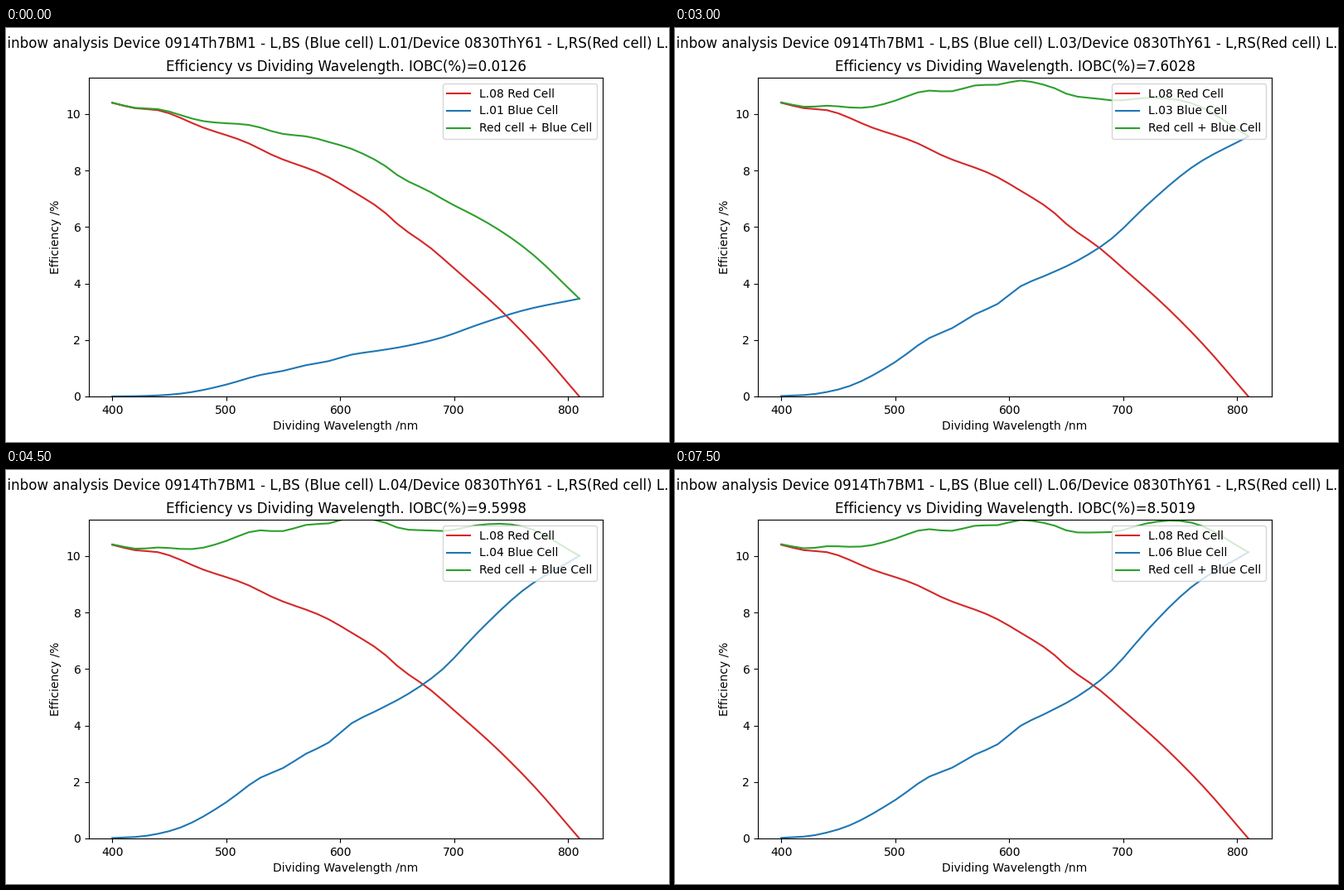
Recreate the animation shown at these times as a matplotlib script. Size 800 by 500 pixels, loop 8000 ms.

```python
import numpy as np
import matplotlib.pyplot as plt
from matplotlib.animation import FuncAnimation

plt.rcParams["font.family"] = "DejaVu Sans"
plt.rcParams["text.hinting_factor"] = 64   # finer letter spacing

INTERVAL = 500   # ms per step
HOLD = 3         # steps each cell stays on screen
STEPS = 16

WAVE = np.arange(400, 811, 10)


def smooth(x, points):
    """Cubic Hermite curve through (x, y) key points, flat outside them."""
    xk, yk = np.array(points, dtype=float).T
    x = np.clip(x, xk[0], xk[-1])
    slope = np.gradient(yk, xk)
    i = np.clip(np.searchsorted(xk, x, side="right") - 1, 0, len(xk) - 2)
    h = xk[i + 1] - xk[i]
    t = (x - xk[i]) / h
    return ((1 + 2 * t) * (1 - t) ** 2 * yk[i]
            + t * (1 - t) ** 2 * h * slope[i]
            + t ** 2 * (3 - 2 * t) * yk[i + 1]
            + t ** 2 * (t - 1) * h * slope[i + 1])


red = smooth(WAVE, [
    (400, 10.40), (420, 10.21), (440, 10.14), (480, 9.52), (520, 8.96),
    (540, 8.56), (590, 7.76), (610, 7.29), (640, 6.49), (650, 6.12),
    (680, 5.24), (700, 4.54), (740, 3.09), (770, 1.86), (810, 0)])

# All blue cells share one response, each scaled by its own slowly varying gain
response = smooth(WAVE, [
    (400, 0.015), (430, 0.09), (460, 0.37), (500, 1.22), (530, 2.07),
    (550, 2.42), (570, 2.91), (590, 3.28), (610, 3.90), (630, 4.25),
    (660, 4.81), (690, 5.59), (720, 6.74), (760, 8.10), (810, 9.21)])

GAIN_AT = (440, 500, 560, 650, 740, 810)
CELLS = [  # IOBC, gain at each wavelength above
    (0.0126, (0.23, 0.344, 0.378, 0.375, 0.375, 0.376)),
    (0.5622, (0.73, 0.787, 0.80, 0.791, 0.777, 0.776)),
    (7.6028, (1, 1, 1, 1, 1, 1)),
    (9.5998, (1.05, 1.05, 1.03, 1.063, 1.08, 1.087)),
    (9.2281, (1.20, 1.082, 1.023, 1.054, 1.121, 1.139)),
    (8.5019, (1.33, 1.115, 1.027, 1.041, 1.095, 1.101)),
]

fig, ax = plt.subplots(figsize=(8, 5), dpi=100)
ax.plot(WAVE, red, color="tab:red", label="L.08 Red Cell")
blue_line, = ax.plot(WAVE, response, color="tab:blue", label="L.01 Blue Cell")
sum_line, = ax.plot(WAVE, red + response, color="tab:green",
                    label="Red cell + Blue Cell")
ax.set_xlim(379.5, 830.5)
ax.set_ylim(0, 11.29)
ax.set_xlabel("Dividing Wavelength /nm")
ax.set_ylabel("Efficiency /%")
blue_label = ax.legend(loc="upper right").get_texts()[1]
title = ax.set_title("")
heading = fig.suptitle("")


def update(step):
    k = step // HOLD
    cell = f"L.{k + 1:02d}"
    iobc, gain = CELLS[k]
    blue = response * smooth(WAVE, list(zip(GAIN_AT, gain)))
    blue_line.set_ydata(blue)
    sum_line.set_ydata(red + blue)
    blue_label.set_text(f"{cell} Blue Cell")
    title.set_text(f"Efficiency vs Dividing Wavelength. IOBC(%)={iobc:.4f}")
    heading.set_text(f"Rainbow analysis Device 0914Th7BM1 - L,BS (Blue cell) {cell}"
                     "/Device 0830ThY61 - L,RS(Red cell) L.08")
    return blue_line, sum_line, blue_label, title, heading


anim = FuncAnimation(fig, update, frames=STEPS, interval=INTERVAL,
                     init_func=lambda: update(0), repeat=True, repeat_delay=0)
plt.show()
```
